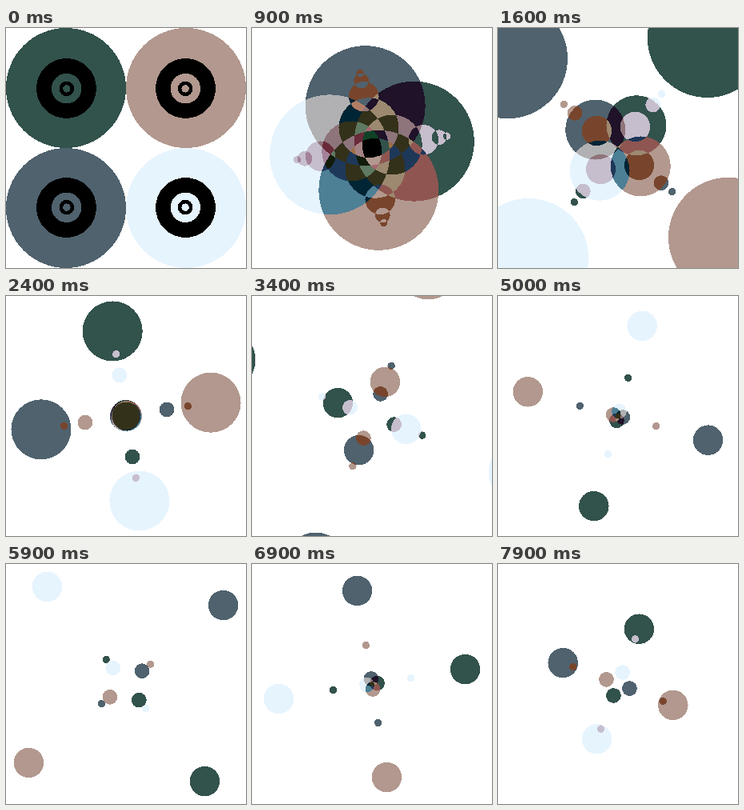
These frames come from a looping animation (300 px wide and 300 px high, 8 s). An HTML page:

```html
<!DOCTYPE html>
<html lang="en">
<head>
<meta charset="utf-8">
<title>Orbiting discs</title>
<style>
  html, body { margin: 0; width: 100%; height: 100%; overflow: hidden; background: #fff; }
  svg { display: block; width: 100vw; height: 100vh; }
  circle { mix-blend-mode: difference; shape-rendering: crispEdges; }
</style>
</head>
<body>
<svg viewBox="0 0 300 300">
  <defs>
    <!-- Converts the blended colours from gamma 1.8 to sRGB. -->
    <filter id="tone" filterUnits="userSpaceOnUse" x="0" y="0" width="300" height="300"
            color-interpolation-filters="sRGB">
      <feComponentTransfer>
        <feFuncR type="gamma" amplitude="1.055" exponent="0.75" offset="-0.055"/>
        <feFuncG type="gamma" amplitude="1.055" exponent="0.75" offset="-0.055"/>
        <feFuncB type="gamma" amplitude="1.055" exponent="0.75" offset="-0.055"/>
      </feComponentTransfer>
    </filter>
  </defs>
  <g id="discs" filter="url(#tone)" style="isolation:isolate"></g>
</svg>
<script>
const LOOP = 8000, STEP = 100;
const CENTER = 150, RADIUS = 75, LEVELS = 5;
const REACH = 104.7;
const SPREAD_START = -1.4, SPREAD_SPEED = 177.3;
const TURN_AT = 5.966;   // seconds until the spread reverses
const SPIN = -60;        // degrees per second

// Painting order matters, because difference blending is not commutative here.
const CORNERS = [
  { fill: '#3e505b', angle: 135 },
  { fill: '#e0f2ff', angle: 45 },
  { fill: '#26413c', angle: 225 },
  { fill: '#a3867c', angle: 315 },
];

const group = document.getElementById('discs');
const discs = [];

for (const { fill, angle } of CORNERS) {
  for (let level = 0; level < LEVELS; level++) {
    const scale = 2 ** -level;
    const el = document.createElementNS('http://www.w3.org/2000/svg', 'circle');
    el.setAttribute('r', RADIUS * scale);
    el.setAttribute('fill', fill);
    group.appendChild(el);
    discs.push({ el, scale, angle });
  }
}

function draw(ms) {
  const t = ms / 1000;
  const spread = SPREAD_START + SPREAD_SPEED * (TURN_AT - Math.abs(TURN_AT - t));
  for (const { el, scale, angle } of discs) {
    const turn = (angle + SPIN * t) * Math.PI / 180;
    const distance = REACH - spread * scale;
    el.setAttribute('cx', (CENTER + distance * Math.cos(turn)).toFixed(2));
    el.setAttribute('cy', (CENTER + distance * Math.sin(turn)).toFixed(2));
  }
}

const start = performance.now();
function tick() {
  const ms = (performance.now() - start) % LOOP;
  draw(Math.floor(ms / STEP) * STEP);
  requestAnimationFrame(tick);
}
draw(0);
requestAnimationFrame(tick);
</script>
</body>
</html>
```
